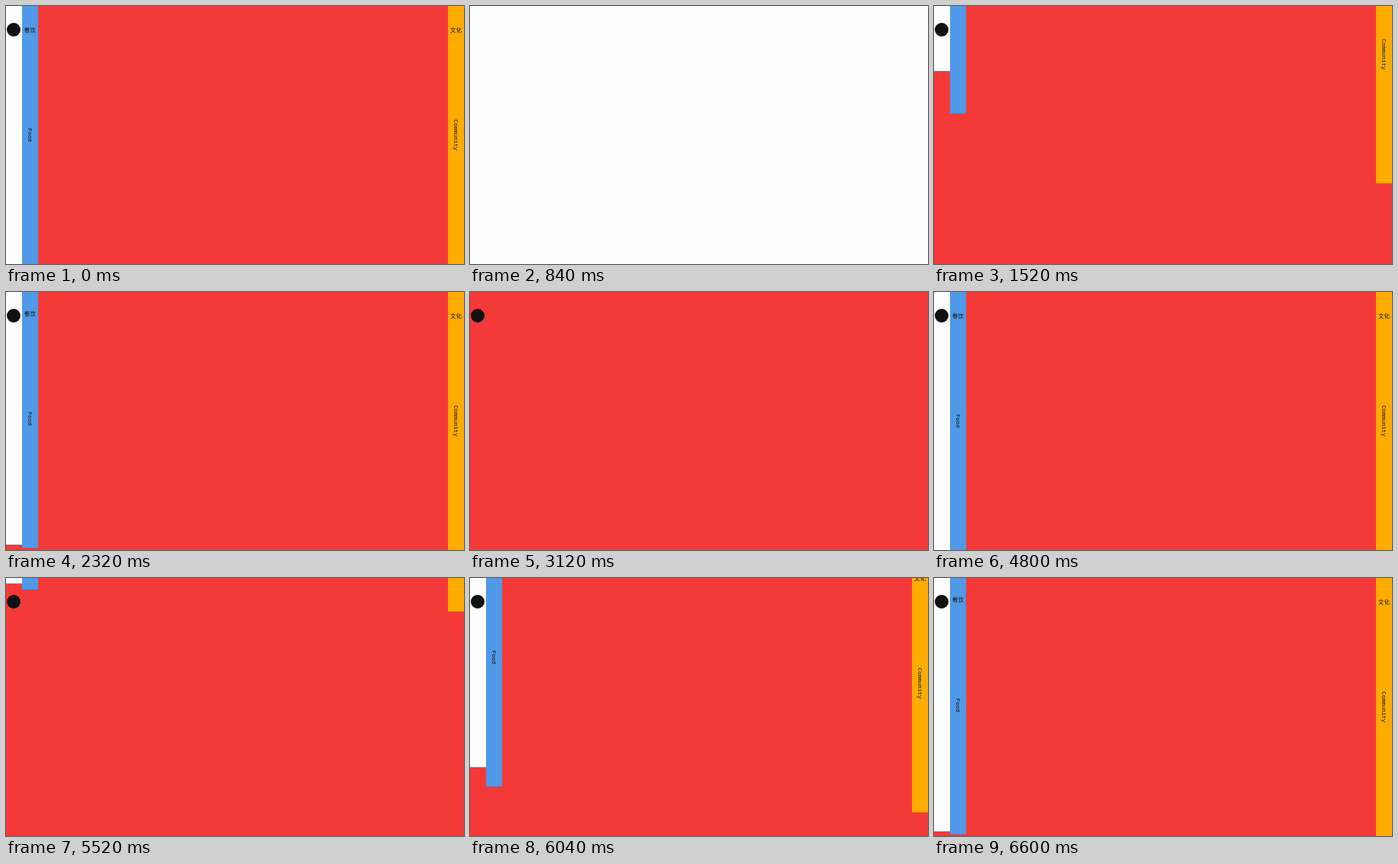
These frames come from a looping animation (600 px wide and 338 px high, 6640 ms). An HTML page with a canvas:

```html
<!DOCTYPE html>
<html lang="en">
<head>
<meta charset="utf-8">
<title>Sliding panels</title>
<style>
  html, body { margin: 0; width: 100%; height: 100%; overflow: hidden; background: #f33a39; }
  canvas { display: block; }
</style>
</head>
<body>
<canvas id="stage" width="600" height="338"></canvas>
<script>
const W = 600, H = 338, LOOP = 6640, BLANK = 200;
const WHITE = '#fdfdfd', RED = '#f33a39', INK = '#111';
const ctx = document.getElementById('stage').getContext('2d');

// Each page load: when the page goes blank, and when the panels start down.
const loads = [
  { blank: 760, start: 960 },
  { blank: 2920, start: 3135 },
  { blank: 5000, start: 5220 }
];

const panels = [
  { x: 0, color: WHITE, delay: 129, time: 1548 },
  { x: 21, color: '#5099e8', delay: 75, time: 1490, cjk: '餐饮', label: 'Food' },
  { x: 579, color: '#ffab00', delay: 0, time: 1330, cjk: '文化', label: 'Community' }
];

// cubic-bezier(.5, 0, .1, 1), solved by bisection
function ease(p) {
  if (p <= 0) return 0;
  if (p >= 1) return 1;
  let lo = 0, hi = 1;
  for (let i = 0; i < 24; i++) {
    const s = (lo + hi) / 2, r = 1 - s;
    if (1.5 * s * r * r + 0.3 * s * s * r + s * s * s < p) lo = s;
    else hi = s;
  }
  return lo * lo * (3 - 2 * lo);
}

function drawPanel({ x, color, cjk, label }, shown) {
  if (shown <= 0) return;
  ctx.save();
  ctx.translate(x, (shown - 1) * H);
  ctx.fillStyle = color;
  ctx.fillRect(0, 0, 21, H);
  if (label) {
    ctx.fillStyle = INK;
    ctx.font = '500 7.4px "Noto Sans CJK SC", "Noto Sans CJK", sans-serif';
    ctx.fillText(cjk, 10.5, 31);
    ctx.translate(10, 169);
    ctx.rotate(Math.PI / 2);
    ctx.font = '7.5px "Liberation Mono", monospace';
    ctx.fillText(label, 0, 0);
  }
  ctx.restore();
}

function draw(t) {
  const load = loads.filter(l => l.blank <= t).pop();
  const blank = load && t < load.blank + BLANK;
  ctx.fillStyle = blank ? WHITE : RED;
  ctx.fillRect(0, 0, W, H);
  if (blank) return;

  for (const p of panels)
    drawPanel(p, load ? ease((t - load.start - p.delay) / p.time) : 1);

  ctx.fillStyle = INK;
  ctx.beginPath();
  ctx.arc(10, 31, 9, 0, 2 * Math.PI);
  ctx.fill();
}

ctx.textAlign = 'center';
ctx.textBaseline = 'middle';

const begin = performance.now();
function frame() {
  draw((performance.now() - begin) % LOOP);
  requestAnimationFrame(frame);
}
frame();
</script>
</body>
</html>
```
